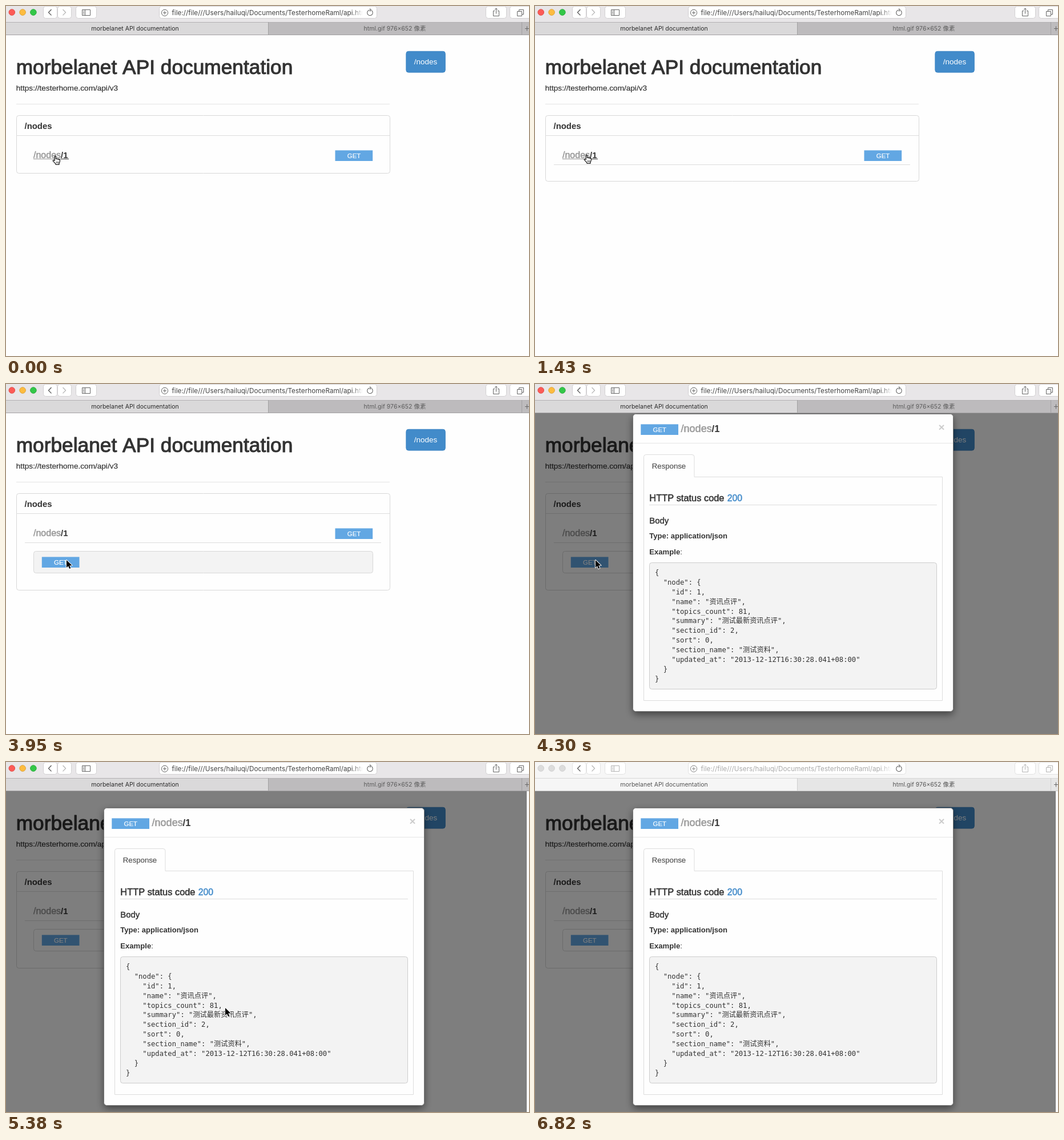
An HTML page with a canvas for the animation above (6.92 s loop, 916x612 px).

```html
<!DOCTYPE html>
<html lang="en">
<head>
<meta charset="utf-8">
<title>API documentation</title>
<style>
html, body { margin: 0; width: 100%; height: 100%; overflow: hidden; background: #fefefe; }
canvas { display: block; }
</style>
</head>
<body>
<canvas id="stage" width="916" height="612"></canvas>
<script>
const ctx = document.getElementById('stage').getContext('2d');
const LOOP = 6920;
const SANS = '"Liberation Sans", Arial, sans-serif';
const UI = 'Inter, "Noto Sans CJK SC", "Noto Sans CJK", sans-serif';
const MONO = '"DejaVu Sans Mono", "Noto Sans CJK SC", "Noto Sans CJK", monospace';
const DARK = '#333', GREY = '#999', LINE = '#ddd', BLUE = '#428bca', BADGE = '#62a7e3';

const HAND = new Path2D('M4.2 9.5L4.2 2.2Q5.3 .4 6.4 2.2L6.4 6.3Q7.8 5.2 8.9 6.8Q10.3 5.9 11.3 7.3Q13.2 6.8 13.5 8.6L13.2 11.5L12 14L12 16.2L6 16.2L5.6 14.6L1.2 9.8Q1.4 7.8 3 8.8Z');
const KNUCKLES = new Path2D('M7.2 11V14M9 11V14M10.8 11V14');
const ARROW = new Path2D('M0 0L0 13L3 10.2L5.1 15L7.3 14L5.2 9.5L9.5 9.2Z');

// start time, cursor shape, x, y
const CURSOR = [
  [0, 'hand', 81, 261], [360, 'hand', 79, 262], [710, 'arrow', 85, 275],
  [1070, 'hand', 85, 259], [1790, 'hand', 86, 260], [2150, 'arrow', 106, 309],
  [2510, 'hand', 102, 309], [3950, 'arrow', 106, 308], [5380, 'arrow', 384, 430],
  [5740, 'arrow', 683, 533], [6100, 'none', 0, 0]
];

const JSON_LINES = [
  '{', '  "node": {', '    "id": 1,', '    "name": "资讯点评",', '    "topics_count": 81,',
  '    "summary": "测试最新资讯点评",', '    "section_id": 2,', '    "sort": 0,',
  '    "section_name": "测试资料",', '    "updated_at": "2013-12-12T16:30:28.041+08:00"', '  }', '}'
];

function text(str, x, y, font, color, { align = 'left', weight = 0 } = {}) {
  ctx.font = font;
  ctx.textAlign = align;
  ctx.fillStyle = color;
  ctx.fillText(str, x, y);
  if (weight) {
    ctx.strokeStyle = color;
    ctx.lineWidth = weight;
    ctx.lineJoin = 'round';
    ctx.strokeText(str, x, y);
  }
}

function rect(x, y, w, h, color) {
  ctx.fillStyle = color;
  ctx.fillRect(x, y, w, h);
}

function box(x, y, w, h, r, fill, border) {
  ctx.beginPath();
  ctx.roundRect(x + .5, y + .5, w - 1, h - 1, r);
  if (fill) { ctx.fillStyle = fill; ctx.fill(); }
  if (border) { ctx.strokeStyle = border; ctx.lineWidth = 1; ctx.stroke(); }
}

function lines(d, color, width = 1) {
  ctx.strokeStyle = color;
  ctx.lineWidth = width;
  ctx.stroke(new Path2D(d));
}

function circle(x, y, r, fill, border) {
  ctx.beginPath();
  ctx.arc(x, y, r, 0, Math.PI * 2);
  if (fill) { ctx.fillStyle = fill; ctx.fill(); }
  if (border) { ctx.strokeStyle = border; ctx.lineWidth = 1; ctx.stroke(); }
}

function badge(x, y) {
  rect(x, y + .4, 65.7, 18.6, BADGE);
  text('GET', x + 33, y + 13.8, '11.4px ' + SANS, '#fff', { align: 'center', weight: .2 });
}

function toolbar(active) {
  const icon = active ? '#666' : '#b4b4b4';
  const edge = active ? '#d2d0d2' : '#e2e2e2';
  rect(0, 0, 916, 28, active ? '#e8e6e8' : '#f6f6f6');

  const lights = active ? ['#fc5b57', '#fdbc40', '#33c748'] : ['#dcdcdc', '#dcdcdc', '#dcdcdc'];
  const rims = active ? ['#e2504c', '#dfa53a', '#2fae40'] : ['#d0d0d0', '#d0d0d0', '#d0d0d0'];
  lights.forEach((c, i) => circle(10.3 + i * 18.8, 11, 5.3, c, rims[i]));

  for (const [x, w] of [[65, 25], [90, 25], [122, 37], [840, 37], [882, 45]])
    box(x, 0, w, 22, 4, '#fff', edge);
  lines('M79.5 6L74.5 11.2L79.5 16.4', '#5a5a5a', 1.3);
  lines('M99.5 6L104.5 11.2L99.5 16.4', '#b8b8b8', 1.3);
  lines('M133.5 6.5H147.5V16.5H133.5ZM138.5 6.5V16.5M135 9H137M135 11.5H137M135 14H137', icon);

  box(268, 0, 382, 22, 4, '#fff', edge);
  circle(278, 11.8, 5.6, null, active ? '#666' : '#888');
  lines('M275 11.8H281M278 8.8V14.8', active ? '#666' : '#888');
  const fade = ctx.createLinearGradient(606, 0, 625, 0);
  fade.addColorStop(0, active ? '#444' : '#aaa');
  fade.addColorStop(1, active ? 'rgba(68,68,68,0)' : 'rgba(170,170,170,0)');
  text('file://file///Users/hailuqi/Documents/TesterhomeRaml/api.html', 290.5, 16, '11.75px ' + UI, fade);

  ctx.beginPath();
  ctx.arc(637.5, 11.8, 4.8, -.9, Math.PI * 1.5);
  ctx.strokeStyle = '#666';
  ctx.lineWidth = 1.1;
  ctx.stroke();
  lines('M637 4.6L639.6 7L637 9.4', '#666', 1.1);

  lines('M856 8.5H853.5V17.5H863.5V8.5H861M858.5 13.5V4M855.8 6.6L858.5 3.9L861.2 6.6', icon);
  lines('M898.5 9V6.5H906.5V14.5H904M895.5 9.5H903.5V17.5H895.5Z', icon);
}

function tabs(active) {
  const edge = active ? '#a3a1a3' : '#cfcfcf';
  rect(0, 28, 460, 23, active ? '#dad9da' : '#f6f6f6');
  rect(460, 28, 456, 23, active ? '#bdbbbd' : '#e6e6e6');
  rect(0, 28, 916, 1, active ? '#b3b1b3' : '#d8d8d8');
  rect(0, 50, 916, 1, edge);
  rect(459, 28, 1, 22, edge);
  rect(903, 28, 1, 22, edge);
  const font = '10.5px ' + UI;
  text('morbelanet API documentation', 226, 43.3, font, active ? '#2b2b2b' : '#555', { align: 'center' });
  text('html.gif 976×652 像素', 681, 43.3, font, active ? '#5c5c5c' : '#555', { align: 'center' });
  lines('M909 39.5H917M912.5 35.5V43.5', '#666');
}

function page(t) {
  rect(0, 51, 916, 561, '#fefefe');
  text('morbelanet API documentation', 17.7, 119, '35.3px ' + SANS, DARK, { weight: 1.1 });
  text('https://testerhome.com/api/v3', 17.7, 148, '13.6px ' + SANS, DARK, { weight: .2 });
  rect(18, 171, 654, 1, '#e4e4e4');
  box(700.4, 78.8, 69.4, 37.8, 4, BLUE, '#3b84c3');
  text('/nodes', 735, 102.3, '13.5px ' + SANS, '#fff', { align: 'center' });

  const bottom = t < 1430 ? 293 : t < 1790 ? 307 : 361;
  box(18, 191, 655, bottom - 191, 4, null, '#d8d8d8');
  rect(18, 226, 654, 1, LINE);
  text('/nodes', 32.5, 215, 'bold 14.9px ' + SANS, DARK);

  text('/nodes', 48, 265.5, '16px ' + SANS, GREY, { weight: .5 });
  text('/1', 96, 265.5, 'bold 14.9px ' + SANS, DARK);
  const hover = t < 710 || (t >= 1070 && t < 2150);
  if (hover) {
    rect(48, 267, 48, 1, GREY);
    rect(96, 267, 14, 1, DARK);
  }
  badge(576.5, 252);

  if (t >= 1430) rect(33, 277, 624, 1, LINE);
  if (t >= 1790) {
    box(48, 292, 595, 39, 4, t >= 2150 && t < 4300 ? '#f3f3f3' : null, '#d8d8d8');
    badge(62.8, 302);
  }
}

function modal(dy) {
  ctx.save();
  ctx.translate(0, dy);
  ctx.save();
  ctx.shadowColor = 'rgba(0,0,0,.5)';
  ctx.shadowBlur = 14;
  ctx.shadowOffsetY = 5;
  box(171, 80, 562, 521, 5, '#fefefe');
  ctx.restore();
  box(171, 80, 562, 521, 5, null, '#777');

  badge(185.3, 98);
  text('/nodes', 255.6, 112, '18px ' + SANS, GREY, { weight: .5 });
  text('/1', 309.6, 112, 'bold 16.6px ' + SANS, DARK);
  text('×', 712, 110.3, 'bold 19px ' + SANS, '#ccc', { align: 'center' });
  rect(172, 131, 560, 1, '#e5e5e5');

  lines('M190.5 190V155.5Q190.5 151.5 194.5 151.5H275Q279 151.5 279 155.5V190.5H713.5V581.5H190.5V190', LINE);
  text('Response', 204.8, 175.5, '13.2px ' + SANS, '#555', { weight: .2 });
  text('HTTP status code', 200.3, 232.7, '16.4px ' + SANS, DARK, { weight: .5 });
  text('200', 336.8, 232.7, '15.8px ' + SANS, BLUE, { weight: .5 });
  rect(200, 239, 504, 1, LINE);
  text('Body', 200.3, 272.3, '14.9px ' + SANS, DARK, { weight: .45 });
  text('Type: application/json', 200.3, 297.5, 'bold 13.05px ' + SANS, DARK);
  text('Example', 200.3, 325.7, 'bold 13.1px ' + SANS, DARK);
  text(':', 254.3, 325.7, '13.1px ' + SANS, DARK);

  box(200, 340, 504, 222, 4, '#f3f3f3', '#ccc');
  JSON_LINES.forEach((line, i) => text(line, 210, 361.7 + i * 16.95, '12.2px ' + MONO, DARK));
  ctx.restore();
}

function cursor(t) {
  const [, kind, x, y] = CURSOR.findLast(k => t >= k[0]);
  if (kind === 'none') return;
  ctx.save();
  ctx.translate(x, y);
  ctx.lineJoin = 'round';
  if (kind === 'hand') {
    ctx.fillStyle = '#fff';
    ctx.fill(HAND);
    ctx.strokeStyle = '#111';
    ctx.lineWidth = 1.2;
    ctx.stroke(HAND);
    ctx.lineWidth = .7;
    ctx.stroke(KNUCKLES);
  } else {
    ctx.strokeStyle = '#fff';
    ctx.lineWidth = 1.8;
    ctx.stroke(ARROW);
    ctx.fillStyle = '#000';
    ctx.fill(ARROW);
  }
  ctx.restore();
}

function draw(t) {
  page(t);
  if (t >= 4300) {
    rect(0, 51, 916, 561, 'rgba(0,0,0,.5)');
    modal(t < 4660 ? -28 : 0);
    if (t >= 4660) rect(912, 51, 4, 561, '#fafafa');
  }
  cursor(t);
  const active = t < 6820;
  toolbar(active);
  tabs(active);
}

const start = performance.now();
function tick() {
  draw((performance.now() - start) % LOOP);
  requestAnimationFrame(tick);
}
tick();
</script>
</body>
</html>
```
